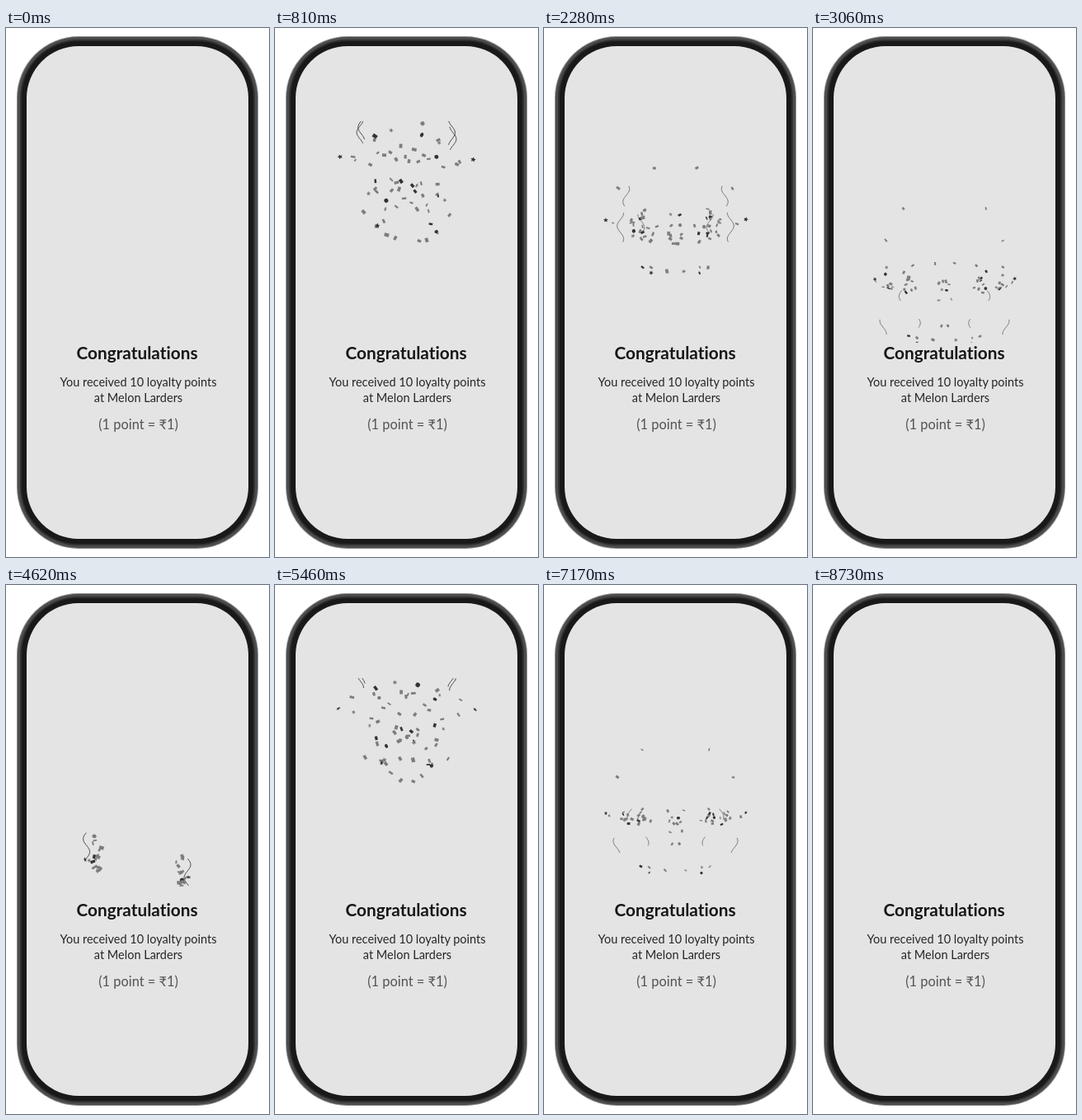
Animation, 319 px wide and 642 px high, one loop 8790 ms. Source, as an HTML page with a canvas:

```html
<!DOCTYPE html>
<html lang="en">
<head>
<meta charset="utf-8">
<title>Loyalty points</title>
<style>
  html, body { margin: 0; width: 100%; height: 100%; overflow: hidden; background: #fff; }
  svg, canvas { position: absolute; left: 0; top: 0; width: 319px; height: 642px; display: block; }
  text {
    font-family: Nunito, Lato, "Noto Sans", sans-serif;
    font-variant-ligatures: none;
    text-anchor: middle;
  }
  .title { font-size: 20.8px; font-weight: 700; fill: #161616; }
  .body { font-size: 14.5px; fill: #262626; }
  .note { font-size: 16.4px; fill: #555; }
</style>
</head>
<body>
<svg viewBox="0 0 319 642">
  <rect x="13" y="10" width="293" height="622" rx="75" fill="#8a8a8a"/>
  <rect x="14" y="11" width="291" height="620" rx="74" fill="#4c4c4c"/>
  <rect x="17" y="14" width="285" height="614" rx="71" fill="#303030"/>
  <rect x="19" y="16" width="281" height="610" rx="68" fill="#191919"/>
  <rect x="25" y="22" width="269" height="598" rx="63" fill="#e4e4e4"/>
  <text class="title" x="159" y="402">Congratulations</text>
  <text class="body" x="160.5" y="435">You received 10 loyalty points</text>
  <text class="body" x="160.5" y="454">at Melon Larders</text>
  <text class="note" x="160.5" y="487">(1 point = ₹1)</text>
</svg>
<canvas id="stage" width="319" height="642"></canvas>
<script>
const ctx = document.getElementById('stage').getContext('2d');
const LOOP = 8790, STEP = 30, BURSTS = [50, 4460], LIFE = 4.265;
const BOX = { x: 62, y: 113, w: 195, h: 269 };
const WIDTH = 319, MID = WIDTH / 2;
const ORIGIN = { x: 101, y: 394 };
const T1 = 1.78, T2 = 2.71;   // moments at which a piece passes its two waypoints
const DRAG = 2.6;
const CROWD = 30;

let seed = 29;
const rand = (a = 0, b = 1) => {
  seed = (seed * 16807) % 2147483647;
  return a + (b - a) * seed / 2147483647;
};
const clamp = v => Math.max(0, Math.min(1, v));

// Drag launch plus steady drift, passing through both waypoints.
function track(o, a, b, delay) {
  const t1 = T1 - delay, t2 = T2 - delay;
  const e = t => 1 - Math.exp(-DRAG * t);
  const push = ((a - o) * t2 - (b - o) * t1) / (e(t1) * t2 - e(t2) * t1);
  const drift = (a - o - push * e(t1)) / t1;
  return t => o + push * e(t - delay) + drift * (t - delay);
}

// Builds a left piece and its mirror twin, which starts a little later.
function addPair(list, x1, y1, x2, y2, delay, style) {
  for (const side of [1, -1]) {
    const wait = delay + (side < 0 ? 0.03 : 0);
    const shift = side < 0 && list === confetti ? rand(-1.5, 1.5) : 0;
    list.push({
      side, delay: wait,
      x: track(ORIGIN.x, x1 + shift, x2 + shift, wait),
      y: track(ORIGIN.y, y1 + shift, y2 + shift, wait),
      ...style()
    });
  }
}

const confetti = [], ribbons = [];

const paper = () => ({
  color: rand() < 0.27 ? '#333' : '#7d7d7d',
  shape: ['box', 'box', 'box', 'dot', 'star'][Math.floor(rand(0, 5))],
  size: rand(4.4, 5.8),
  angle: rand(0, 6.28), turn: rand(-2.5, 2.5),
  flip: rand(0, 6.28), rate: rand(2, 5)
});

// The crowd fills a round bowl, then sinks into a side cluster, a core and a low fringe.
for (let i = 0; i < CROWD; i++) {
  const y1 = 168 + 86 * (i + rand()) / CROWD;
  const half = 54 * Math.sqrt(1 - ((y1 - 203) / 60) ** 2);
  const x1 = MID - half * rand(0.06, 1);
  let x2 = 110 + (x1 - 128) * 0.4 + rand(-15, 15);
  let y2 = 285 + rand(-9, 9) + rand(-9, 9);
  if (y1 > 244) {
    x2 = x1 - 4;
    y2 = y1 + 97;
  } else if (x1 > 146) {
    x2 = rand(150, 158);
    y2 = rand(272, 316);
  }
  const delay = i % 2 ? rand(0.16, 0.4) : rand(0.04, 0.1);
  addPair(confetti, x1, y1, x2, y2, delay, paper);
}

// Stragglers above the crowd and out on the wings.
addPair(confetti, 147, 145, 119, 200, 0.2, paper);
addPair(confetti, 91, 161, 89, 233, 0.2, paper);
addPair(confetti, 75, 194, 75, 277, 0.08, paper);
addPair(confetti, 88, 198, 79, 280, 0.08, paper);

[[95, 138], [97, 176], [113, 171]].forEach(([x, y], i) => {
  addPair(ribbons, x, y, x + (i % 2 ? -9 : 10), y + 140, 0.09 + i * 0.08, () => ({
    length: [33, 48, 28][i], phase: i * 1.7
  }));
});

function place(p, t) {
  const x = p.x(t);
  ctx.translate(p.side > 0 ? x : WIDTH - x, p.y(t));
}

function drawRibbon(p, t) {
  const len = p.length * (1 - 0.62 * clamp((t - 1.9) / 0.8));
  ctx.save();
  place(p, t);
  ctx.scale(p.side, 1);
  ctx.beginPath();
  for (let s = -0.5; s <= 0.501; s += 0.05) {
    ctx.lineTo(4 * Math.sin(s * len * 0.2 + p.phase + t * 1.5), s * len);
  }
  ctx.strokeStyle = '#4c4c4c';
  ctx.lineWidth = t > 2.2 ? 0.7 : 1;
  ctx.stroke();
  ctx.restore();
}

function drawPaper(p, t) {
  const s = p.size * (1 - 0.25 * clamp((t - 1.8) / 0.9));
  ctx.save();
  place(p, t);
  ctx.rotate(p.angle + p.turn * t);
  ctx.scale(1, 0.45 + 0.55 * Math.abs(Math.cos(p.flip + p.rate * t)));
  ctx.fillStyle = p.color;
  ctx.beginPath();
  if (p.shape === 'dot') {
    ctx.arc(0, 0, s * 0.48, 0, 7);
  } else if (p.shape === 'star') {
    for (let i = 0; i < 10; i++) {
      const r = s * (i % 2 ? 0.28 : 0.62), a = i * Math.PI / 5;
      ctx.lineTo(r * Math.cos(a), r * Math.sin(a));
    }
  } else {
    ctx.rect(-s / 2, -s * 0.38, s, s * 0.76);
  }
  ctx.fill();
  ctx.restore();
}

function drawBurst(t) {
  if (t <= 0 || t >= LIFE) return;
  ctx.globalAlpha = clamp((LIFE - t) / 0.25);
  const live = p => t > p.delay;
  ribbons.filter(live).forEach(p => drawRibbon(p, t));
  confetti.filter(live).forEach(p => drawPaper(p, t));
}

function frame(now) {
  const ms = Math.floor((now % LOOP) / STEP) * STEP;
  ctx.clearRect(0, 0, WIDTH, 642);
  ctx.save();
  ctx.beginPath();
  ctx.rect(BOX.x, BOX.y, BOX.w, BOX.h);
  ctx.clip();
  BURSTS.forEach(start => drawBurst((ms - start) / 1000));
  ctx.restore();
}

const begin = performance.now();
function loop() {
  frame(performance.now() - begin);
  requestAnimationFrame(loop);
}
loop();
</script>
</body>
</html>
```
